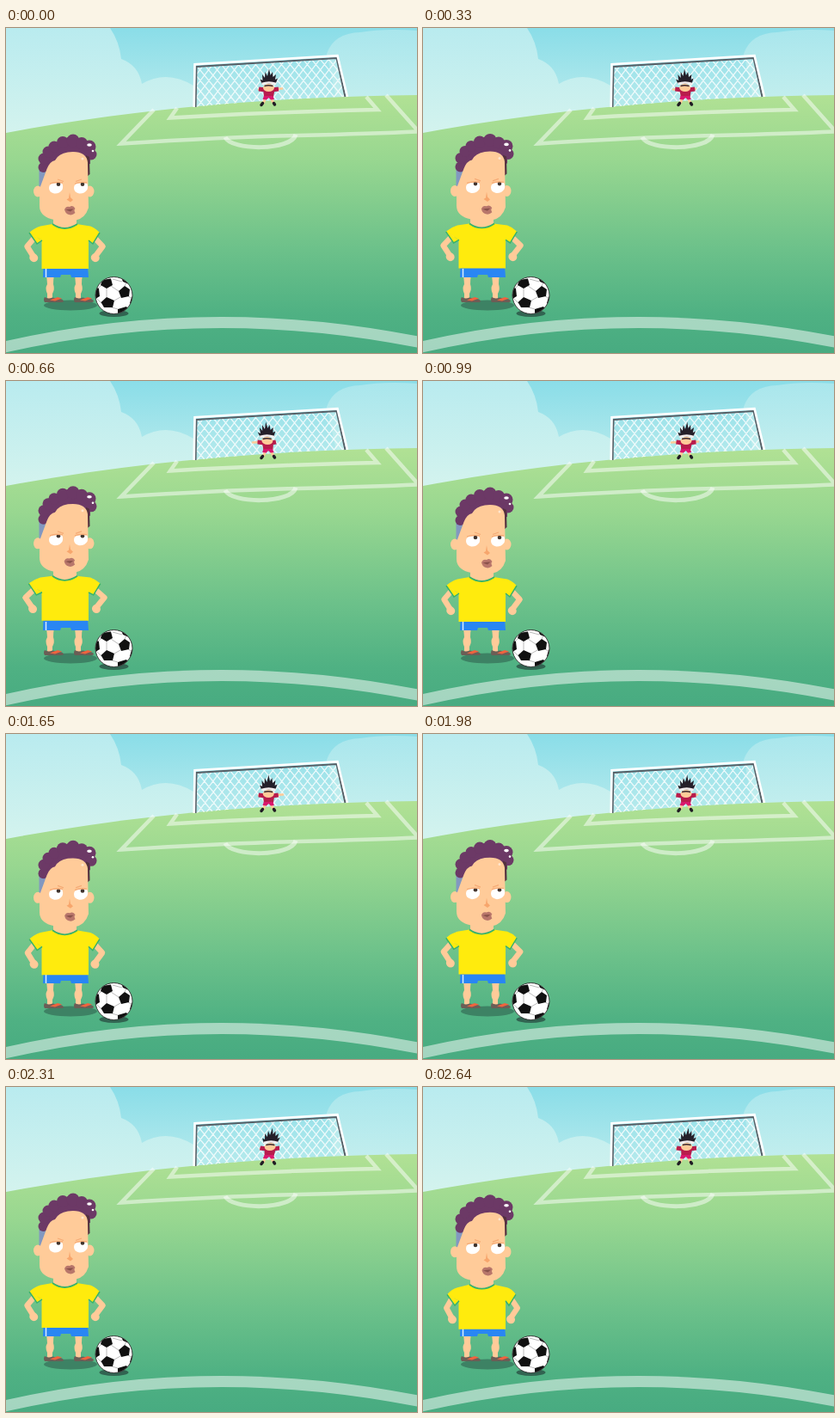
Recreate the animation shown at these times as an HTML page. Size 478 by 378 pixels, loop 2970 ms.

```html
<!DOCTYPE html>
<html>
<head>
<meta charset="utf-8">
<style>
html, body { margin: 0; width: 100%; height: 100%; overflow: hidden; }
svg { display: block; width: 478px; height: 378px; }
.skin { fill: #ffcb99; }
.limb { fill: none; stroke: #ffcb99; stroke-linejoin: round; stroke-linecap: round; }
.line { fill: none; stroke: #fff; stroke-opacity: .5; }
</style>
</head>
<body>
<svg viewBox="0 0 478 378">
  <defs>
    <linearGradient id="sky" x2="0" y2="1">
      <stop stop-color="#8adde8"/><stop offset="1" stop-color="#c9f0ee"/>
    </linearGradient>
    <linearGradient id="grass" gradientUnits="userSpaceOnUse" x1="0" y1="78" x2="0" y2="378">
      <stop stop-color="#b1e194"/><stop offset=".25" stop-color="#98d790"/>
      <stop offset=".6" stop-color="#6cc18a"/><stop offset=".85" stop-color="#4fb183"/>
      <stop offset="1" stop-color="#48ab81"/>
    </linearGradient>
    <linearGradient id="cloud" gradientUnits="userSpaceOnUse" x1="0" y1="0" x2="0" y2="120">
      <stop stop-color="#b9ebef"/><stop offset="1" stop-color="#d3f3ee"/>
    </linearGradient>
    <clipPath id="netArea"><path d="M221 45L384 35L393 80Q300 83 220 92Z"/></clipPath>
    <clipPath id="ballArea"><circle cx="125.5" cy="311" r="21.5"/></clipPath>
  </defs>

  <rect width="478" height="130" fill="url(#sky)"/>
  <path fill="url(#cloud)" d="M0 0H121Q132 16 134 36Q154 43 158 65Q187 48 218 67V130H0Z"/>
  <path fill="url(#cloud)" opacity=".65" d="M478 3Q440 0 412 5Q381 6 373 30L386 90H478Z"/>
  <path fill="url(#grass)" d="M0 122C160 92 320 80 478 78V378H0Z"/>

  <g class="line">
    <path stroke-width="4.500" d="M172 95L134 134.500Q250 127 340 125T480 120.500L442 78"/>
    <path stroke-width="4.500" d="M199 93L191 104.500Q300 98 432 95L419 80"/>
    <path stroke-width="5" d="M255 127C262 143 332 143 337 124"/>
    <path stroke-width="13" d="M-10 373Q235 315 488 367"/>
  </g>

  <g fill="none">
    <path id="net" clip-path="url(#netArea)" stroke="#fff" stroke-width="1.300" stroke-opacity=".8"/>
    <path stroke="#575f66" stroke-width="2" d="M220.500 92L221.500 45L384.500 35L394.500 80"/>
    <path stroke="#fff" stroke-width="2.600" d="M218.700 92L219.500 42.300L385.500 32.200L397 80"/>
  </g>

  <g id="keeper">
    <path fill="none" stroke="#ffcb99" stroke-width="3" d="M302 81L299 88M308 81L311 87"/>
    <path stroke="#201c24" stroke-width="3.500" stroke-linecap="round" d="M297 89.500L298.500 87.500M312.500 89L311.500 87.500"/>
    <g id="keeperTop">
      <path id="armSkin" class="limb" stroke-width="2.600"/>
      <path id="armRed" fill="none" stroke="#b81c4c" stroke-width="5"/>
      <path fill="#b81c4c" d="M299 69H313L311 80H300Z"/>
      <path fill="#d9176d" d="M300 79H310.500L312 83L308 83.500L305.500 81L303 83.500L298.500 83Z"/>
      <ellipse class="skin" cx="305.500" cy="69.500" rx="6.500" ry="4.500"/>
      <path fill="#241f29" d="M297.500 65L295.500 59.500L298.500 61L298 54L301 58L301.500 51L304 56L306 47.500L307.500 55L310 51L310.500 57L314 54L313 60L316 58.500L313.500 65Z"/>
      <path stroke="#f4eeee" stroke-width="2.500" d="M297.500 65Q306 62 314 65" fill="none"/>
      <path stroke="#3a2930" stroke-width="1.500" d="M300.500 67.500Q305 66 310.500 67.500" fill="none"/>
    </g>
  </g>

  <ellipse cx="75" cy="322.500" rx="31" ry="6" fill="#3d8264"/>
  <g class="skin">
    <path d="M47 286H56Q55 293 55 298Q57 304 54 309V316H48V309Q45 303 48 298Z"/>
    <path d="M80 286H89Q88 293 88 298Q90 304 87 309V316H81V309Q78 303 81 298Z"/>
  </g>
  <g id="shoe">
    <path fill="#6b5e56" d="M45 313Q49 315.500 54 313.500L65 315.500Q69 318.500 65 319H45Q43 316 45 313Z"/>
    <path fill="#f1633e" d="M51 316.500L60 313L65 314.500L57 317.500Z"/>
  </g>
  <use href="#shoe" x="35"/>
  <path fill="#2986f3" d="M43.500 276H95L96 290H76L75 287H64L63 290H43Z"/>
  <path stroke="#d9ecff" stroke-width="1.500" d="M46.500 280V290"/>

  <g id="arms" class="limb"></g>
  <g id="body">
    <path id="shirt" fill="#ffeb0d"/>
    <path id="cuffs" fill="none" stroke="#38b26b" stroke-width="1.500"/>
    <path class="skin" d="M55 216H82V228Q68 238 55 228Z"/>
    <path fill="none" stroke="#38b26b" stroke-width="1.800" d="M54 228Q68 238 83 228"/>
    <path fill="#8298c0" d="M38.500 165L48 160L42 187L38.500 185Z"/>
    <g id="hair" fill="#6c3966"><path d="M40 164L45 142L72 127L98 134L98 158Z"/></g>
    <path fill="#54313f" d="M93 148L97 150L97.500 170L94 173Z"/>
    <g class="skin">
      <ellipse cx="37" cy="190" rx="5" ry="6.500"/>
      <ellipse cx="97.500" cy="190" rx="5" ry="6.500"/>
      <path d="M39 187L47.500 164Q51 155 57 154Q61 146 72 144.500Q93 142 95 156L96 209Q92 222 80 224Q66 227 52 222Q39 218 39 207Z"/>
    </g>
    <g fill="#fff">
      <ellipse cx="97" cy="136" rx="2.800" ry="1.800"/><circle cx="101" cy="143" r="1.300"/>
      <circle cx="89" cy="152" r="1.500" fill="#ffe6cd"/>
      <path id="eye" d="M50 186Q50 180.500 57 180.500L65 180.500Q67 184 65.500 188Q62 193 56 192.500Q50 191 50 186Z"/>
      <use href="#eye" x="29"/>
    </g>
    <g id="pupils" fill="#41342e"><circle cx="61" cy="181.700" r="2.300"/><circle cx="89" cy="181.700" r="2.300"/></g>
    <path fill="none" stroke="#f5ab76" stroke-width="1.300" d="M51 181Q58 178.500 66 180M80 181Q87 178.500 94 180M60 176L67 178.500M81 178.500L88 176"/>
    <path fill="#f7a66d" d="M74 191L75 197L78 200L75 202.500L70.500 199.500L73 198Z"/>
    <g id="mouth">
      <path fill="#b8766b" d="M68 211Q70 206.500 74 208Q78 205.500 80.500 210Q78.500 212 80.500 215Q77 218.500 73 217Q69 216 68 211Z"/>
      <path fill="#8a524b" d="M69.500 211.500Q74 210 78.500 210.500L75 213.500Z"/>
    </g>
  </g>

  <ellipse cx="125.500" cy="332" rx="17" ry="4" fill="#316451"/>
  <circle cx="125.500" cy="311" r="21.500" fill="#fff"/>
  <g clip-path="url(#ballArea)">
    <path fill="none" stroke="#aaa" stroke-width=".8" d="M122 300L131 306M117 303L117 313M126 317L133 313M111 299L107 303M124 292L135 295M111 320L105 314M123 325L130 327M142 312L146 314M138 300L141 295"/>
    <path fill="#111" d="M112 293L122 291.500L124 299L117 303L110 299ZM138 300L144 304L143 312L134 314L131 306ZM117 313L126 317L124 325L114 325L110.500 319ZM103 301L108 303L109 312L104 315ZM130 327L140 324L144 329L130 336ZM133 288L141 292L143 298L136 295ZM146 313L149 311V321L144 320Z"/>
  </g>
  <circle cx="125.500" cy="311" r="21.500" fill="none" stroke="#3b3b3b"/>
</svg>
<script>
const $ = id => document.getElementById(id);
const set = (id, name, value) => $(id).setAttribute(name, value);

let mesh = "";
for (let x = 140; x < 460; x += 10) mesh += `M${x} 30l54 65M${x} 30l-50 65`;
set("net", "d", mesh);

const curls = [[43.5, 162, 6], [44, 152, 6.5], [49, 144, 6.5], [56, 138, 6.5], [66, 133, 7],
  [78, 131, 7.5], [88, 134, 7], [97, 138, 7.5], [99, 147, 6.5]];
$("hair").innerHTML += curls.map(([x, y, r]) => `<circle cx="${x}" cy="${y}" r="${r}"/>`).join("");

const STEP = 330;
const breath = [0, .6, 1.2, 0, -1, -.3, .4, 0, -1.7];
const sway = [0, -1.5, -3, 1, 4, -.5, 1, 3, 2];
const leftHand = [293, 290, 286, 288, 291, 293, 294, 295, 294];
const rightHand = [322, 318, 314, 321, 328, 323, 320, 318, 318];
const eyeDrop = [0, 0, -.3, .3, .8, .5, 0, -.2, .6];

function arm(shoulder, elbow, hand, drop) {
  return `<path stroke-width="6.5" d="M${shoulder} ${244 + drop}L${elbow} ${254 + drop}L${hand} ${266 + drop}"/>
    <path stroke-width="9.5" d="M${hand} ${267 + drop}l.5 .5"/>`;
}

// Breathing out lowers the shoulders and draws the sleeves in.
function drawShirt(out) {
  const top = 230.5 + .6 * out, tip = 238 + out, cuff = 251 + .8 * out, inset = .6 * out;
  const left = `${27 + inset} ${tip}L${36 + inset} ${cuff}L42 247`;
  const right = `${109 - inset} ${tip}L${101 - inset} ${cuff}L96 247`;
  set("cuffs", "d", `M${left}M${right}`);
  set("shirt", "d", `M54 228Q68 238 82 228L98 ${top}Q104 ${top + 2} ${right}V280H41.500V247L${left}L${27 + inset} ${tip}Q33 ${top + 2} 40 ${top}Z`);
}

function draw(i) {
  const b = breath[i], lean = sway[i];
  set("body", "transform", `translate(0 ${-b})`);
  drawShirt(-b);
  $("arms").innerHTML = arm(33, 24.5 - 1.6 * b, 32 - b, -1.8 * b) + arm(103, 112.5 + 1.6 * b, 103.5 + b, -1.8 * b);
  set("pupils", "transform", `translate(0 ${eyeDrop[i]})`);
  set("mouth", "transform", `translate(${-.3 * b} ${-.2 * b})`);

  // The keeper leans over planted feet.
  const k = -lean / 30;
  set("keeperTop", "transform", `matrix(1 0 ${k} 1 ${-k * 86} 0)`);
  const l = leftHand[i] - lean * .5, r = rightHand[i] - lean * .5;
  set("armSkin", "d", `M301 71L${l + 1} 71.5M310 71L${r - 1} 70.5`);
  set("armRed", "d", `M302 72L${Math.max(l, 294)} 71M309 72L${Math.min(r, 317)} 71`);
}

function tick() {
  draw(Math.floor(performance.now() / STEP) % 9);
  requestAnimationFrame(tick);
}
tick();
</script>
</body>
</html>
```
